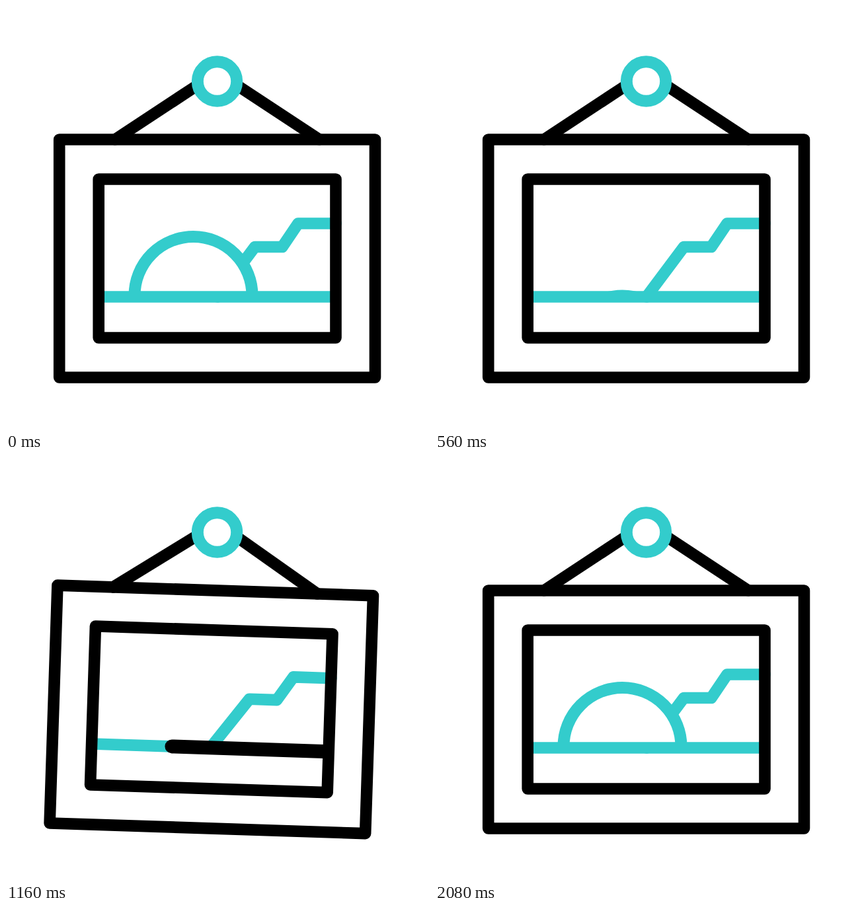
Animation of 640x640 px, one loop 2.48 s. Source, as an HTML page:

```html
<!DOCTYPE html>
<html lang="en">
<head>
<meta charset="utf-8">
<title>Swinging picture</title>
<style>
  html, body { margin: 0; width: 100%; height: 100%; overflow: hidden; background: #fff; }
  svg { display: block; width: 100vw; height: 100vh; }
  .ink, .teal { fill: none; stroke-width: 17.6; stroke-linecap: round; stroke-linejoin: round; }
  .ink { stroke: #000; }
  .teal { stroke: #3cc; }
  .solid { fill: #fff; stroke-width: 18; }
  #bar { stroke-width: 21; }
</style>
</head>
<body>
<svg viewBox="0 0 640 640">
  <clipPath id="sky"><rect x="140" y="262" width="359" height="178"/></clipPath>
  <g id="picture">
    <path class="teal" d="M320 440 L376.5 364.5 H418 L442 329 H499"/>
    <g clip-path="url(#sky)">
      <circle id="sun" class="teal solid" cx="283.5" cy="438" r="89"/>
    </g>
    <path class="teal" d="M141 440 H498"/>
    <line id="bar" class="ink" y1="440" y2="440"/>
    <rect class="ink" x="140.2" y="262" width="358.8" height="240"/>
    <rect class="ink" x="80.7" y="202" width="477.8" height="360"/>
    <path class="ink" d="M165 202 L291 119 M474 202 L348 119"/>
  </g>
  <circle class="teal solid" cx="319.5" cy="114" r="29.7"/>
</svg>
<script>
  const LOOP = 2480, STEP = 40;
  const [picture, sun, bar] = ["picture", "sun", "bar"].map(id => document.getElementById(id));

  // Keys are [time in ms, value], eased in and out between neighbours.
  const swing = [[0, 0], [360, 3], [760, -3], [1200, 2], [1640, 0]];
  const sink = [[0, 0], [700, 100], [1600, 100], [2080, 0]];
  const head = [[594, 142], [1211, 497]];
  const tail = [[871, 142], [1613, 497]];

  function at(keys, t) {
    if (t <= keys[0][0]) return keys[0][1];
    for (let i = 1; i < keys.length; i++) {
      const [t0, a] = keys[i - 1], [t1, b] = keys[i];
      if (t < t1) {
        const s = (t - t0) / (t1 - t0);
        return a + (b - a) * s * s * (3 - 2 * s);
      }
    }
    return keys[keys.length - 1][1];
  }

  function draw(now) {
    const t = Math.floor(now % LOOP / STEP) * STEP;
    const x1 = at(tail, t), x2 = at(head, t);
    picture.setAttribute("transform", `rotate(${at(swing, t)} 319.5 114)`);
    sun.setAttribute("transform", `translate(0 ${at(sink, t)})`);
    bar.setAttribute("x1", x1);
    bar.setAttribute("x2", x2);
    bar.setAttribute("visibility", x2 > x1 ? "visible" : "hidden");
  }

  const start = performance.now();
  function tick() {
    draw(performance.now() - start);
    requestAnimationFrame(tick);
  }
  tick();
</script>
</body>
</html>
```
